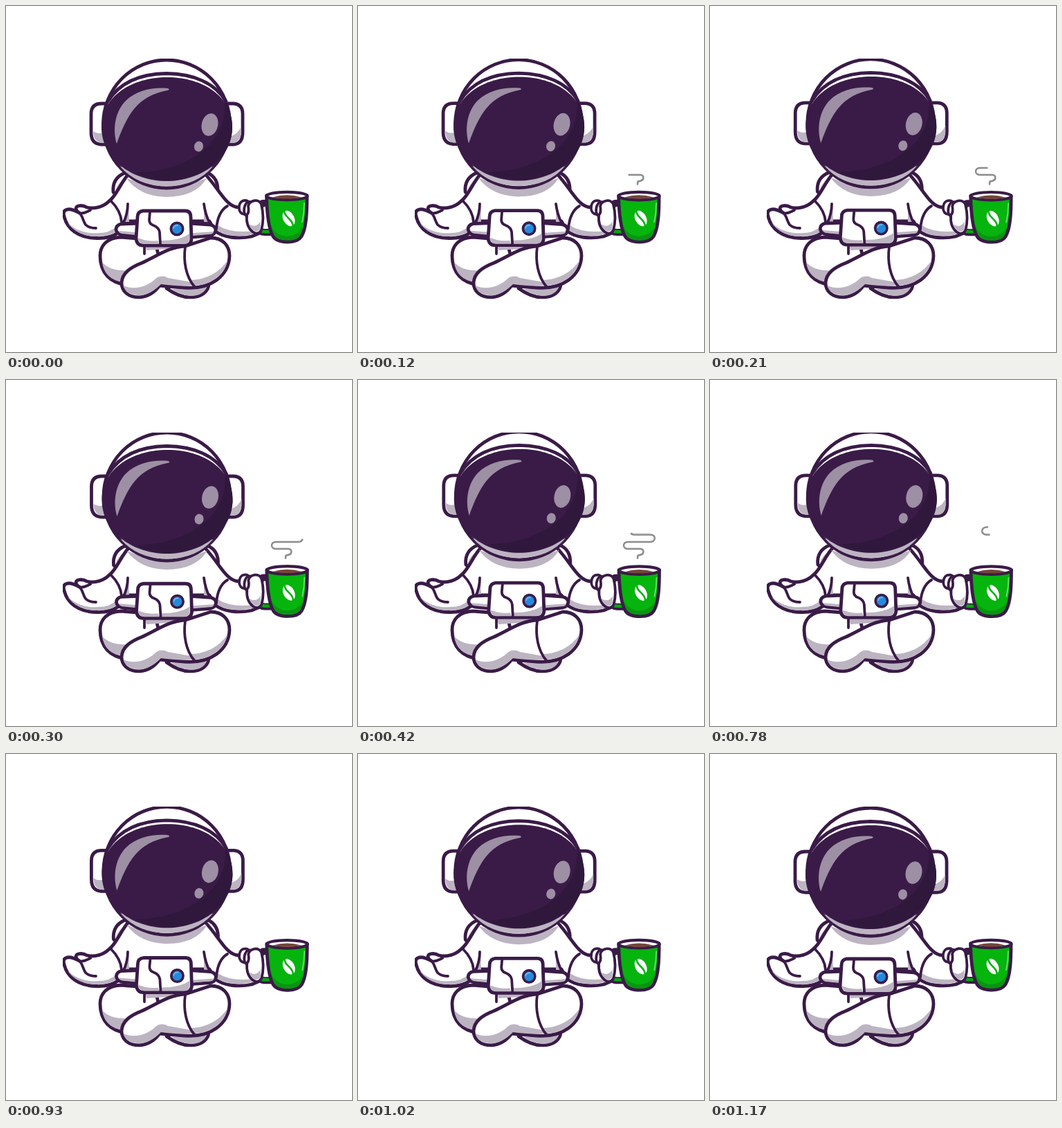
An HTML page for the animation above (1.8 s loop, 500 by 500 pixels).

```html
<!DOCTYPE html>
<html lang="en">
<head>
<meta charset="utf-8">
<title>Astronaut with coffee</title>
<style>
  html, body { margin: 0; width: 100%; height: 100%; overflow: hidden; background: #fff; }
  svg { display: block; width: 500px; height: 500px; clip-path: inset(76px 62px 76.5px 82px); }
  .suit, .line { stroke: #3a1b47; stroke-width: 4.8; stroke-linecap: round; stroke-linejoin: round; }
  .suit { fill: #fff; }
  .line { fill: none; }
  .thin { stroke-width: 3.8; }
  .shade { fill: #bdb4c2; }
  .glint { fill: #9d8fa4; }
  .steam { fill: none; stroke-linejoin: round; }
</style>
</head>
<body>
<svg viewBox="0 0 500 500">
  <g id="pack">
    <path class="suit" d="M172 241Q153 249 155 269L166 279 184 250ZM291 241Q307 248 306 268L297 275 280 250Z"/>
    <path class="shade" d="M166 254Q158 262 158 269L163 271 176 250ZM297 254L304 266 299 269 288 252Z"/>
  </g>

  <!-- legs -->
  <path class="suit" d="M232 408Q250 421 266 421C282 421 293 413 293 401L255 397Z"/>
  <path class="shade" d="M238 409L291 404Q286 419 267 419 254 418 238 409Z"/>
  <path class="suit" d="M166 334C145 335 136 347 136 361C136 386 151 400 174 403L225 380 215 338Z"/>
  <path class="shade" d="M139 370Q150 384 180 382L170 399C151 397 141 386 139 370Z"/>
  <path class="shade" d="M201 345H262L250 350 203 353Z"/>
  <path class="line thin" d="M200 342V358"/>
  <path class="suit" d="M259 347L296 335C313 335 323 346 323 361C322 390 296 410 258 407L222 404C216 412 206 420 193 421C176 421 167 412 167 400C168 386 179 378 197 371C222 359 237 348 259 347Z"/>
  <path class="shade" d="M170 404C184 411 203 406 214 396Q223 387 234 393L268 399 270 404Q258 406 224 402C214 412 204 418 193 418C179 418 171 412 170 404ZM268 396Q302 394 320 368C316 388 298 402 273 404Z"/>
  <path class="line thin" d="M259 348C256 369 260 391 272 405"/>

  <!-- torso and arms -->
  <path class="suit" d="M178 242C166 254 160 274 149 282C141 290 128 294 117 291C110 287 101 288 101 293Q102 297 106 299C99 295 91 292 86 295Q82 297 84 304C88 321 104 336 132 335.500Q151 336 163 327L171 311 294 311 302 325C314 335 337 337 355 333L369 327 350 292 336 291C318 290 310 267 287 242Z"/>
  <path class="shade" d="M89 313Q106 330 133 328 151 328 160 318L160 326Q150 333 131 333 101 332 89 313ZM306 317Q325 329 358 325L365 327Q350 333 332 332 314 331 305 324Z"/>
  <path class="shade" d="M177 287L178 312H170ZM286 287L286 312H294Z"/>
  <path class="line thin" d="M106 299C111 303 111 311 115 316Q120 321 130 321M106 299C113 301 117 297 122 295M151 281Q166 296 167 312M176 286Q176 299 170 313M286 286Q288 301 294 313M320 289C308 296 305 310 304 322"/>

  <g id="belt">
    <path class="suit" d="M191 314L166 315Q159 317 159 323 160 330 169 331L191 333ZM266 314L295 316Q303 318 303 324 302 331 294 332L266 334Z"/>
    <path class="shade" d="M163 325L188 327V331L168 329Q163 328 163 325ZM270 328L300 326Q300 330 293 330L270 332Z"/>
    <path class="suit" d="M198 296H259Q267 296 267 305L268 337Q267 346 258 346H198Q189 346 188 336L190 305Q190 297 198 296Z"/>
    <path class="shade" d="M191 335Q205 341 219 339L221 344H199Q191 343 191 335ZM223 339Q252 339 265 329V337Q264 344 257 344H224Z"/>
    <path class="line thin" d="M208 298L207 309Q207 315 213 317 221 320 222 327L223 344"/>
    <circle cx="247" cy="322" r="8.700" fill="#2789da" stroke="#3a1b47" stroke-width="3.600"/>
    <path d="M242 321Q243 317 248 317" fill="none" stroke="#65b6ef" stroke-width="2" stroke-linecap="round"/>
  </g>

  <g id="cup">
    <path class="line" d="M381 285H371Q366 287 366 300V322Q367 327 374 327H385" style="stroke-width:10"/>
    <path d="M366 320Q367 326 374 326H385" fill="none" stroke="#07a50d" stroke-width="4.500"/>
    <path class="line" d="M376.500 274C377 299 379 321 386 333Q391 341 407 341 422 341 427 333C434 321 435 299 435 274Z" style="fill:#05b40c"/>
    <path d="M382 313Q387 332 407 333 423 331 429 319 427 329 424 333 419 338.500 407 338.500 394 338.500 389 332 384 324 382 313Z" fill="#0a9413"/>
    <path d="M431 285Q431 299 428 312" fill="none" stroke="#61dc64" stroke-width="2" stroke-linecap="round"/>
    <ellipse class="suit" cx="406" cy="274.500" rx="29.500" ry="5.700" style="stroke-width:4.200"/>
    <path d="M385 276.500Q406 270 427 276.500 418 278.500 406 278.500 394 278.500 385 276.500Z" fill="#754638"/>
    <g transform="rotate(-28 408.500 307)">
      <ellipse cx="408.500" cy="307" rx="8" ry="12" fill="#fff"/>
      <path d="M408.500 294C403 302 414 311 408.500 320" fill="none" stroke="#05b40c" stroke-width="2.500"/>
    </g>
    <path class="suit thin" d="M341 300C334 296 336 281 345 281Q350 281 351 285L352 303Z"/>
    <path class="suit thin" d="M348 304C341 299 344 283 352 283Q357 283 358 291L357 306Z"/>
    <path class="suit thin" d="M348 302C351 299 351 294 350 289C352 280 366 278 369 287C372 299 372 313 369 324Q364 332 356 326C350 321 347 312 348 302Z"/>
    <path class="shade" d="M351 315Q361 322 368 311L367 323Q362 328 357 324 352 320 351 315Z"/>
  </g>

  <g id="head">
    <path class="shade" d="M174 249Q232 271 290 249 274 276 231 276 193 275 174 249Z"/>
    <path class="suit" d="M147 141H138Q123 141 123 156V183Q123 199 137 200H148ZM318 141H329Q342 142 342 156V183Q342 199 329 200H318Z"/>
    <path class="shade" d="M126 181Q134 187 145 181V198H138Q126 196 126 181ZM322 189Q335 186 340 174V184Q338 197 329 198H322Z"/>
    <ellipse class="suit" cx="232" cy="170.500" rx="91.500" ry="92.500"/>
    <path class="shade" d="M165 232Q232 262 299 232 275 260.500 232 260.500 190 260.500 165 232Z"/>
    <path class="line" d="M147 138C164 111 193 98 232 97.500C271 98 302 111 318 138"/>
    <path d="M138 175C138 131 181 103 233 103S327 131 327 175C327 221 282 253 232 253S138 221 138 175Z" fill="#3a1b47"/>
    <path d="M316 135Q327 155 327 176C326 221 281 252 232 252Q206 251 186 241C270 238 322 194 316 135Z" fill="#30183d"/>
    <path class="glint" d="M160 199C154 179 157 153 173 137C189 121 214 117 234 119Q238 121 233 122C190 130 175 157 160 199Z"/>
    <ellipse class="glint" cx="294.500" cy="171.500" rx="11.700" ry="16.500" transform="rotate(13 294.500 171.500)"/>
    <ellipse class="glint" cx="278.500" cy="203" rx="6.500" ry="7.500" transform="rotate(13 278.500 203)"/>
  </g>

  <path class="steam" stroke="#737373" stroke-width="2.400"/>
  <path class="steam" stroke="#b5b5b5" stroke-width=".8"/>
</svg>
<script>
  const LOOP = 1800, STEP = 30, SWAY = 1200;
  const STEAM = "M404 258.5V256Q404 253 407 253C414 252 414 244 408 244H390C382 244 382 234 390 234H422C431 234 431 223 422 223.5H400C391 224 390 212 402 212.5";
  const steam = [...document.querySelectorAll(".steam")];
  // How far each part drifts at the top of the float.
  const drift = { pack: [1, -3], belt: [1, -3.5], cup: [.6, .8], head: [1, -4] };
  const clamp = x => Math.max(0, Math.min(1, x));

  steam.forEach(path => path.setAttribute("d", STEAM));
  const length = steam[0].getTotalLength();

  function draw(now) {
    const t = Math.floor(now % LOOP / STEP) * STEP;
    const sway = t < SWAY ? (1 - Math.cos(2 * Math.PI * t / SWAY)) / 2 : 0;
    for (const [id, [x, y]] of Object.entries(drift)) {
      document.getElementById(id).setAttribute("transform", `translate(${x * sway} ${y * sway})`);
    }

    const tail = clamp((t - 500) / 340) * length;
    const tip = clamp(t / 470) * length;
    steam.forEach(path => {
      path.style.display = tip > tail ? "" : "none";
      path.setAttribute("stroke-dasharray", `0 ${tail} ${tip - tail} ${length}`);
    });
    requestAnimationFrame(() => draw(performance.now()));
  }
  draw(0);
</script>
</body>
</html>
```
